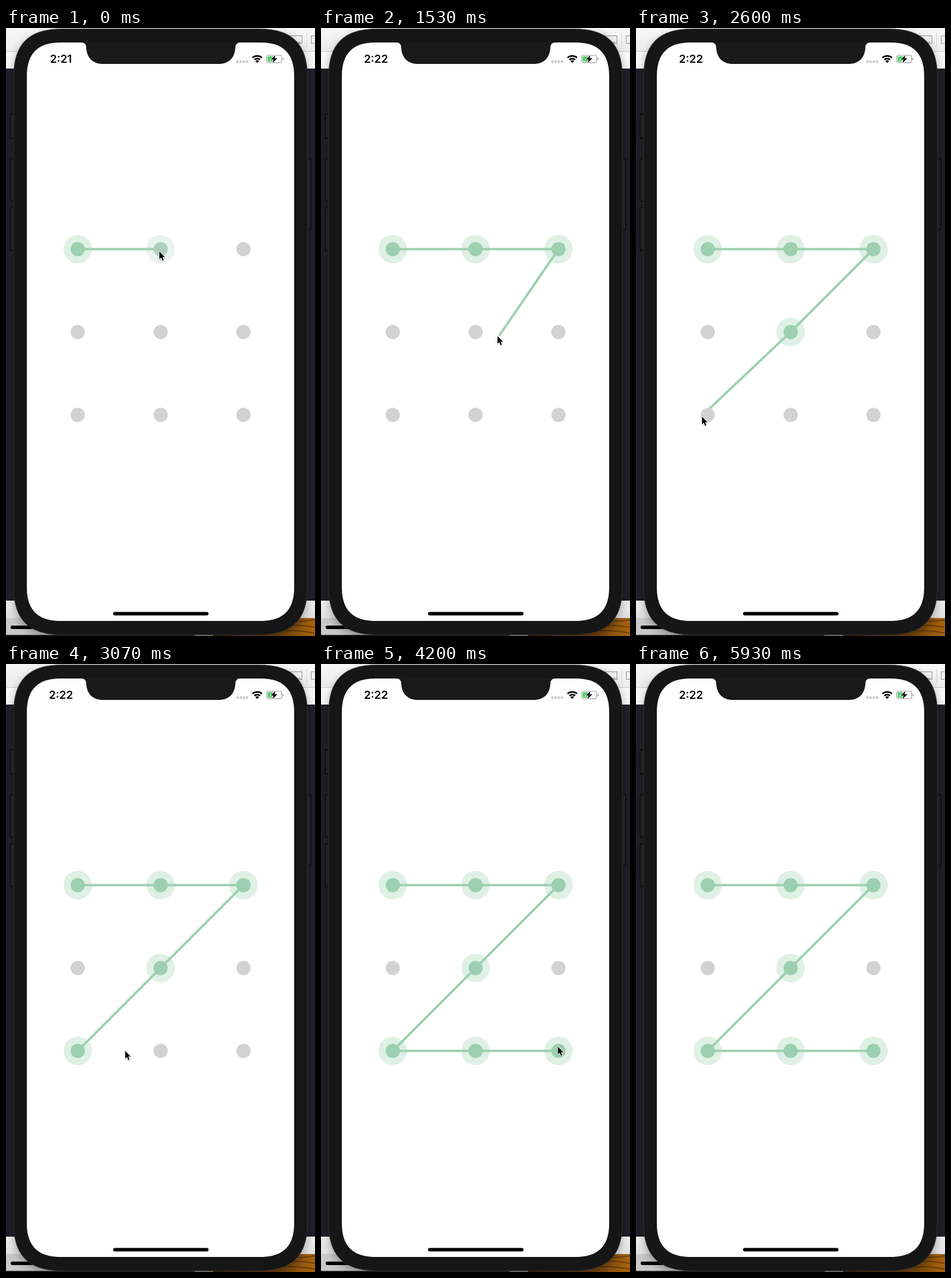
Recreate the animation shown at these times as an HTML page. Size 534x1049 px, loop 6.14 s.

```html
<!DOCTYPE html>
<html lang="en">
<head>
<meta charset="utf-8">
<title>Pattern lock</title>
<style>
  html, body { margin: 0; width: 100%; height: 100%; overflow: hidden; background: #fff; }
  svg { display: block; width: 100%; height: 100%; }
  #clock { font: 600 19px Inter, Roboto, sans-serif; text-anchor: middle; }
</style>
</head>
<body>
<svg viewBox="0 0 534 1049">
  <defs>
    <linearGradient id="bar" x2="0" y2="1">
      <stop stop-color="#f7f7f7"/><stop offset="1" stop-color="#ececec"/>
    </linearGradient>
    <linearGradient id="foot" x2="0" y2="1">
      <stop stop-color="#f2f2f2"/><stop offset="1" stop-color="#e0e0e0"/>
    </linearGradient>
    <linearGradient id="wood">
      <stop stop-color="#2c1a05"/><stop offset=".7" stop-color="#7a460a"/><stop offset="1" stop-color="#a8640f"/>
    </linearGradient>
    <filter id="soft" x="-50%" y="-50%" width="200%" height="200%">
      <feDropShadow dx="0" dy="1" stdDeviation="1" flood-opacity=".3"/>
    </filter>
    <filter id="shade" x="-10%" y="-5%" width="120%" height="110%">
      <feDropShadow dx="0" dy="6" stdDeviation="8" flood-opacity=".3"/>
    </filter>
  </defs>

  <!-- desktop behind the phone -->
  <rect width="534" height="41" fill="url(#bar)"/>
  <rect y="40" width="534" height="1" fill="#c8c8c8"/>
  <rect y="41" width="534" height="29" fill="#f8f8f8"/>
  <g fill="none" stroke="#8c8c8c">
    <path d="M490.500 8V33M519.500 8V33" stroke="#d2d2d2"/>
    <rect x="491.500" y="13.500" width="20" height="13"/>
    <path d="M494 24.500H509"/>
    <rect x="527.500" y="13.500" width="20" height="13"/>
  </g>
  <rect y="70" width="534" height="918" fill="#1f1f28"/>
  <rect y="988" width="534" height="30" fill="url(#foot)"/>
  <rect y="1018" width="358" height="31" fill="#c9c9c9"/>
  <rect x="8" y="1031" width="60" height="6" rx="3"/>
  <rect y="1047" width="326" height="2" fill="#222"/>
  <rect x="326" y="1047" width="32" height="2" fill="#8a8a8a"/>
  <rect x="358" y="1018" width="176" height="31" fill="url(#wood)"/>
  <path d="M480 1022Q510 1026 534 1021M470 1032Q505 1028 534 1034M440 1043Q490 1036 534 1044"
        fill="none" stroke="#3c2003" stroke-width="2" opacity=".5"/>

  <!-- phone -->
  <g fill="#242424" stroke="#0b0b0b" stroke-width="1.500">
    <rect x="7" y="148" width="12" height="42" rx="3"/>
    <rect x="7" y="225" width="12" height="74" rx="3"/>
    <rect x="7" y="310" width="12" height="74" rx="3"/>
    <rect x="515" y="225" width="12" height="123" rx="3"/>
  </g>
  <path id="body" filter="url(#shade)" fill="#191919" stroke="#3a3a3a" stroke-width=".7"/>
  <path id="screen" fill="#fff"/>
  <path d="M130 24H405V25Q397 25 396.500 33C395.500 52 385 62 367 62H168C150 62 139.500 52 138.500 33Q138 25 130 25Z" fill="#191919"/>
  <rect x="185" y="1007.500" width="165" height="6" rx="3"/>

  <!-- status bar -->
  <text id="clock" x="95" y="60">2:21</text>
  <g fill="#c8c8c8">
    <circle cx="400" cy="58" r="2.200"/><circle cx="405.500" cy="58" r="2.200"/>
    <circle cx="411" cy="58" r="2.200"/><circle cx="416.500" cy="58" r="2.200"/>
  </g>
  <g fill="none" stroke="#000" stroke-width="2.700">
    <path d="M426 51.300A12 12 0 0 1 442.400 51.300"/>
    <path d="M429.300 54.800A7.200 7.200 0 0 1 439.100 54.800"/>
  </g>
  <path d="M434.200 60.300L431 57A4.600 4.600 0 0 1 437.400 57Z"/>
  <rect x="450.500" y="47" width="26" height="12.800" rx="3.500" fill="none" stroke="#999" stroke-width="1.200"/>
  <path d="M478.200 51.300Q480 52 480 53.400T478.200 55.500Z" fill="#999"/>
  <rect x="452.200" y="48.700" width="10.500" height="9.400" rx="1.800" fill="#4bd063"/>
  <path d="M465.800 46.500L457.500 54.500H462.400L460.500 60.500L469 52.300H464Z" stroke="#fff" stroke-width="1.800" paint-order="stroke"/>

  <!-- lock pattern -->
  <g id="rings" fill="#9dd0b0"></g>
  <polyline id="line" fill="none" stroke="#9dd0b0" stroke-width="4" stroke-linecap="round" stroke-linejoin="round"/>
  <g id="dots"></g>

  <g id="cursor">
    <path filter="url(#soft)" transform="translate(0 1.500) scale(.87)" stroke="#fff" stroke-width="2" paint-order="stroke" stroke-linejoin="round"
          d="M0 0V15.300L3.600 12L6.200 18L8.700 16.900L6.200 11.100H10.900Z"/>
  </g>
</svg>
<script>
const LOOP = 6140, STEP = 1000 / 15, LAG = 0.25, FADE = 3;
const $ = id => document.getElementById(id);

// Where the pointer rests or turns: step, x, y
const STOPS = [
  [1, 265, 384], [6, 372, 384], [9, 372, 384], [14, 421, 375], [17, 421, 375],
  [23, 305, 530], [26, 267, 528], [32, 266, 527], [34, 187, 589], [39, 114, 669],
  [45, 122, 668], [46, 206, 666], [57, 401, 655.5], [60, 412, 659], [69, 402, 657],
  [74, 438, 52], [77, 430, 29], [80, 430, 29], [89, 211, -18]
];

// Cells in drawing order, with the step at which each is picked
const PICKS = [[0, -9], [1, -2.1], [2, 10.5], [4, 27], [6, 41.6], [7, 47.2], [8, 60]];
const DRAG_RESUMES = 47;

const clamp = v => Math.max(0, Math.min(1, v));
const cells = [...Array(9).keys()];
const cell = i => [124 + i % 3 * 143.2, 381.5 + Math.floor(i / 3) * 143];

// Rectangle with continuous corners: the curve starts at `reach`, with handles at `pull`
function squircle(l, t, r, b, reach, pull) {
  const corner = (x, y, dx, dy, turn) => {
    const ends = [[x + dx * reach, y], [x + dx * pull, y], [x, y + dy * pull], [x, y + dy * reach]];
    const [a, ...curve] = turn ? ends : ends.reverse();
    return `${a} C${curve.join(" ")}`;
  };
  return "M" + [corner(l, t, 1, 1, true), corner(l, b, 1, -1, false),
    corner(r, b, -1, -1, true), corner(r, t, -1, 1, false)].join(" L") + "Z";
}
$("body").setAttribute("d", squircle(13, 1.5, 521, 1047, 84, 26));
$("screen").setAttribute("d", squircle(36, 25, 498, 1023, 58, 19));

function circle(parent, i, r) {
  const c = document.createElementNS("http://www.w3.org/2000/svg", "circle");
  const [x, y] = cell(i);
  c.setAttribute("cx", x);
  c.setAttribute("cy", y);
  c.setAttribute("r", r);
  return $(parent).appendChild(c);
}
const rings = cells.map(i => circle("rings", i, 24.6));
const dots = cells.map(i => circle("dots", i, 12.3));

// Speed through stop n: zero at rests and turns, else the harmonic mean of both sides
function speed(n, axis) {
  if (n === 0 || n === STOPS.length - 1) return 0;
  const slope = i => (STOPS[i + 1][axis] - STOPS[i][axis]) / (STOPS[i + 1][0] - STOPS[i][0]);
  const a = slope(n - 1), b = slope(n);
  return a * b > 0 ? 2 * a * b / (a + b) : 0;
}

// Smooth curve through the stops that never overshoots them
function pointer(k) {
  const n = Math.max(0, STOPS.findLastIndex(s => s[0] <= k));
  const a = STOPS[n], b = STOPS[n + 1];
  if (!b || k <= a[0]) return a.slice(1);
  const span = b[0] - a[0], u = (k - a[0]) / span, v = 1 - u;
  return [1, 2].map(axis =>
    v * v * (1 + 2 * u) * a[axis] + u * u * (1 + 2 * v) * b[axis] +
    span * u * v * (v * speed(n, axis) - u * speed(n + 1, axis)));
}

const tint = f => `rgb(${[157, 208, 176].map(c => Math.round(210 + (c - 210) * f))})`;

function draw(k) {
  cells.forEach(i => {
    const pick = PICKS.find(p => p[0] === i);
    const f = pick ? clamp((k - pick[1]) / FADE) : 0;
    rings[i].setAttribute("opacity", 0.33 * f);
    dots[i].setAttribute("fill", tint(f));
  });

  const picked = PICKS.filter(p => p[1] <= k).map(p => p[0]);
  const points = picked.map(cell);
  const paused = picked.length === 5 && k < DRAG_RESUMES;
  if (picked.length < PICKS.length && !paused) points.push(pointer(k - LAG));
  $("line").setAttribute("points", points.join(" "));

  $("cursor").setAttribute("transform", `translate(${pointer(k)})`);
  $("clock").textContent = k < 4 ? "2:21" : "2:22";
}

const start = performance.now();
function tick() {
  const t = (performance.now() - start) % LOOP;
  draw(Math.floor((t + 3.4) / STEP));
  requestAnimationFrame(tick);
}
tick();
</script>
</body>
</html>
```
